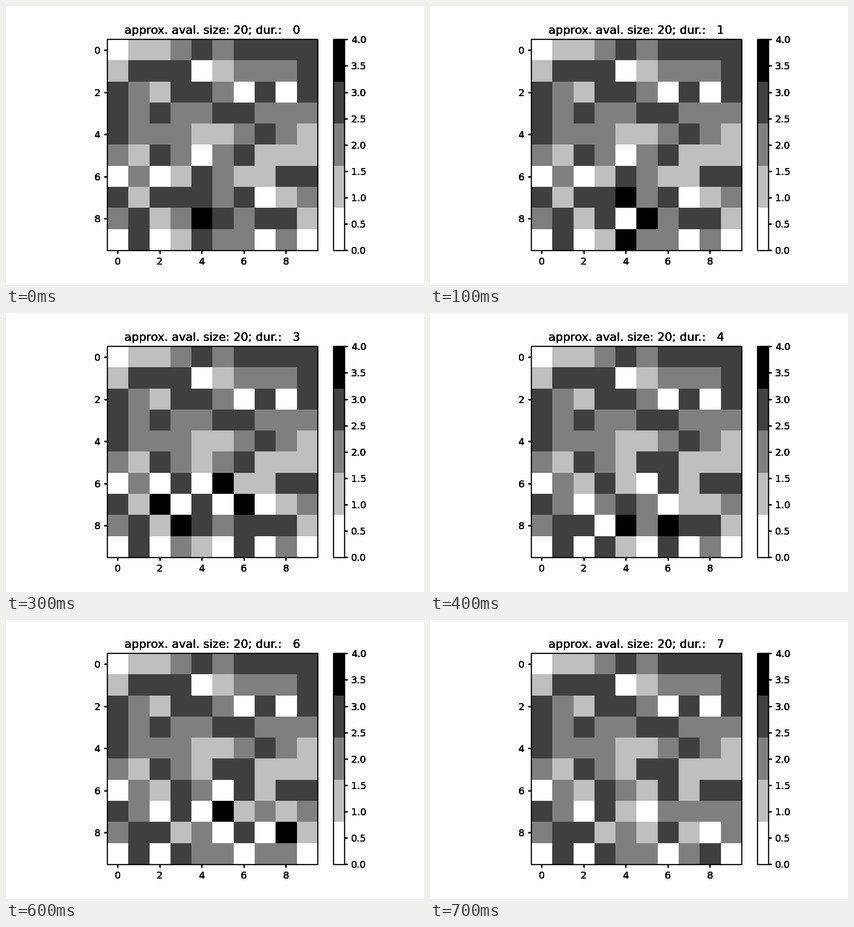
A matplotlib script that plays this animation: 780 px wide and 520 px high, repeating every 0.8 s.

```python
import matplotlib.pyplot as plt
import numpy as np
from matplotlib.animation import FuncAnimation

STEPS = 8
THRESHOLD = 4

ROWS = """
0112323333
1333012223
3213320303
3232233222
3222112321
2132023111
0201321133
3133323012
2312432331
0301322020
"""


def topple(grid):
    """Topple every unstable cell at once; grains fall off at the borders."""
    unstable = (grid >= THRESHOLD).astype(int)
    padded = np.pad(unstable, 1)
    received = (padded[:-2, 1:-1] + padded[2:, 1:-1]
                + padded[1:-1, :-2] + padded[1:-1, 2:])
    return grid - THRESHOLD * unstable + received


def harden_edges(image, dpi):
    """Make soft edges of text and lines nearly opaque."""
    image = image.copy()
    image[..., 3] = np.minimum(1, 4 * image[..., 3])
    return image, 0, 0


states = [np.array([[int(c) for c in row] for row in ROWS.split()])]
while len(states) < STEPS:
    states.append(topple(states[-1]))

fig, ax = plt.subplots(figsize=(6, 4), dpi=130, facecolor="white")
fig.subplots_adjust(left=0.125, right=0.9, bottom=0.125, top=0.88)
picture = ax.imshow(states[0], cmap=plt.get_cmap("gray_r", 5), vmin=0, vmax=4)
bar = fig.colorbar(picture, ax=ax)
title = ax.set_title("")
for axes in (ax, bar.ax):
    axes.set_agg_filter(harden_edges)


def update(step):
    picture.set_data(states[step])
    title.set_text(f"approx. aval. size: 20; dur.:{step:4d}")
    return picture, title


animation = FuncAnimation(fig, update, frames=STEPS, interval=100,
                          repeat=True, repeat_delay=0, blit=False)
plt.show()
```
